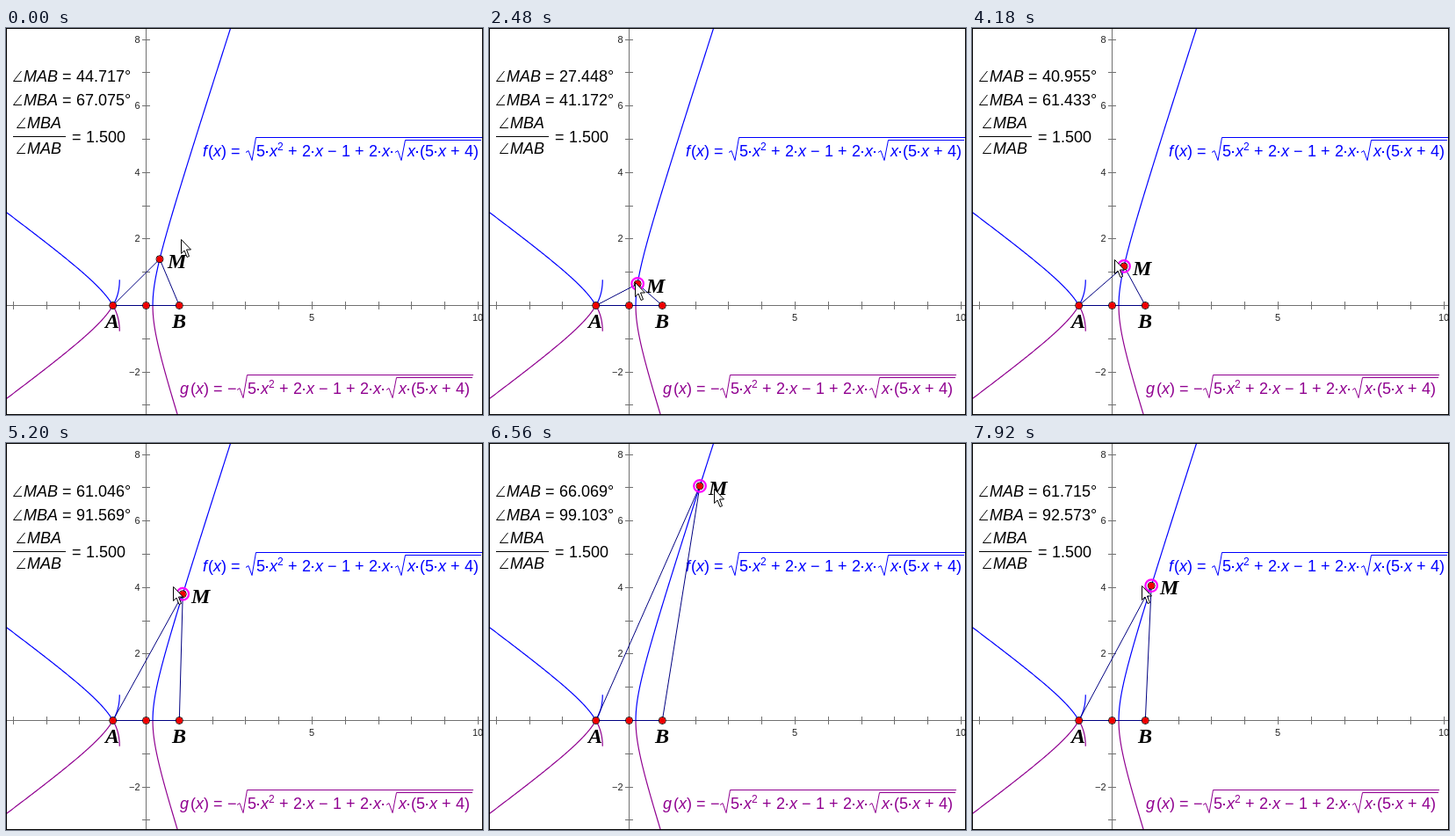
An HTML page with a canvas for the animation above (8000 ms loop, 543 px wide and 440 px high).

```html
<!DOCTYPE html>
<html>
<head>
<meta charset="utf-8">
<style>
html, body { margin: 0; width: 100%; height: 100%; overflow: hidden; background: #fff; }
canvas { display: block; }
</style>
</head>
<body>
<canvas id="stage" width="543" height="440"></canvas>
<script>
const ctx = document.getElementById('stage').getContext('2d');
const W = 543, H = 440, LOOP = 8000;
const OX = 159.5, OY = 315.5, UNIT = 37.8;
const STEP = 340, FIRST_STEP = 100, GRAB_STEP = 4;
const SANS = '"Liberation Sans", Arial, sans-serif';
const SERIF = '"Liberation Serif", "Times New Roman", serif';
const BLUE = '#0000ff', PURPLE = '#900090', NAVY = '#000080';
const EASE_UP = 0.6, EASE_DOWN = 1.7;

// The drag: step, angle MAB in degrees, easing power on the way there.
const ANGLE_KEYS = [
  { step: 0, at: [44.7168] },
  { step: GRAB_STEP, at: [44.7168] },
  { step: 8, at: [27.448] },
  { step: 10, at: [17] },
  { step: 11, at: [22] },
  { step: 12, at: [22] },
  { step: 13, at: [40.9552] },
  { step: 16, at: [61.046], power: EASE_UP },
  { step: 20, at: [66.0688], power: EASE_UP },
  { step: 21, at: [66.25] },
  { step: 24, at: [61.7152], power: EASE_DOWN }
];
const CURSOR_KEYS = [
  { step: 0, at: [199, 240] },
  { step: 1, at: [201, 239] },
  { step: 2, at: [182, 258] },
  { step: 3, at: [178, 262] },
  { step: GRAB_STEP, at: [178, 262] },
  { step: 8, at: [166, 289] },
  { step: 10, at: [165, 301] },
  { step: 11, at: [165, 288] },
  { step: 12, at: [165, 288] },
  { step: 13, at: [162, 263] },
  { step: 16, at: [190, 163] },
  { step: 20, at: [256, 52] },
  { step: 24, at: [193, 162] }
];

function valueAt(keys, step) {
  const i = keys.findIndex(key => key.step >= step);
  const to = keys[i], from = keys[Math.max(0, i - 1)];
  if (to.step === step) return to.at;
  const k = ((step - from.step) / (to.step - from.step)) ** (to.power || 1);
  return from.at.map((v, j) => v + (to.at[j] - v) * k);
}

const px = x => OX + x * UNIT;
const py = y => OY - y * UNIT;
const curve = x => Math.sqrt(Math.max(0,
  5 * x * x + 2 * x - 1 + 2 * x * Math.sqrt(Math.max(0, x * (5 * x + 4)))));

function path(points, color, width = 1) {
  ctx.beginPath();
  points.forEach(([x, y]) => ctx.lineTo(x, y));
  ctx.strokeStyle = color;
  ctx.lineWidth = width;
  ctx.stroke();
}

function text(s, x, y, font, color = '#000', align = 'left') {
  ctx.font = font;
  ctx.fillStyle = color;
  ctx.textAlign = align;
  ctx.fillText(s, x, y);
}

const upright = (s, x, y, color) => text(s, x, y, `18px ${SANS}`, color);
const italic = (s, x, y, color) => text(s, x, y, `italic 18px ${SANS}`, color);
const pointLabel = (s, x, y) => text(s, x, y, `italic bold 24px ${SERIF}`);

// Sets a formula on whole-pixel advances; ² becomes a small raised digit.
function formula(s, x, y, color) {
  const advance = { 'x': 9, '·': 5, ' ': 5, '(': 6, ')': 6, '+': 11, '−': 11, '²': 7 };
  for (const c of s) {
    if (c === '²') text('2', x, y - 7, `12px ${SANS}`, color);
    else if (c === '·') { ctx.fillStyle = color; ctx.fillRect(x + 1, y - 6, 2, 2); }
    else (c === 'x' ? italic : upright)(c, x, y, color);
    x += advance[c] || 10;
  }
}

function radical(x, top, bottom, end, color) {
  path([[x, bottom - 9], [x + 3, bottom - 11], [x + 7, bottom], [x + 11.5, top], [end, top]], color);
}

function rootExpression(x, y, color) {
  radical(x, y - 21.5, y + 4.5, x + 269, color);
  formula('5·x² + 2·x − 1 + 2·x·', x + 12, y, color);
  radical(x + 170, y - 18.5, y + 4.5, x + 268, color);
  formula('x·(5·x + 4)', x + 184, y, color);
}

function angleName(name, x, y) {
  path([[x + 9.5, y - 12], [x + 0.5, y - 0.5], [x + 10, y - 0.5]], '#000');
  italic(name, x + 12, y);
}

function circle(x, y, radius, color, width) {
  ctx.beginPath();
  ctx.arc(x, y, radius, 0, 2 * Math.PI);
  ctx.strokeStyle = color;
  ctx.lineWidth = width;
  ctx.stroke();
}

function dot(x, y) {
  circle(x, y, 4, '#000', 1);
  ctx.fillStyle = '#f00000';
  ctx.beginPath();
  ctx.arc(x, y, 3.5, 0, 2 * Math.PI);
  ctx.fill();
}

function drawAxes() {
  const gray = '#707070';
  path([[0, OY], [W, OY]], gray);
  path([[OX, 0], [OX, H]], gray);
  for (let i = -4; i <= 10; i++) {
    const x = Math.floor(px(i)) + 0.5;
    path([[x, OY - 4.5], [x, OY + 4.5]], gray);
    if (i > 0 && i % 5 === 0) text(i, x - 0.5, 332.5, `11px ${SANS}`, '#222', 'center');
  }
  for (let i = -3; i <= 8; i++) {
    const y = Math.floor(py(i)) + 0.5;
    path([[OX - 4.5, y], [OX + 4.5, y]], gray);
    if (i && i % 2 === 0) {
      text(String(i).replace('-', '−'), 152.5, y + 3.5, `11px ${SANS}`, '#222', 'right');
    }
  }
}

function drawCurves() {
  for (const [sign, color] of [[1, BLUE], [-1, PURPLE]]) {
    for (const [start, dir] of [[-0.8, -1], [0.2, 1]]) {
      const points = [];
      for (let u = 0; u <= 1.9; u += 0.01) {
        const x = start + dir * u * u;
        points.push([px(x), py(sign * curve(x))]);
      }
      path(points, color, 1.2);
    }
  }
}

function drawFormulas() {
  italic('f', 224, 146, BLUE);
  formula('(x)', 230, 146, BLUE);
  upright('=', 256, 146, BLUE);
  rootExpression(273, 146, BLUE);
  italic('g', 198, 416, PURPLE);
  formula('(x)', 210, 416, PURPLE);
  upright('=', 236, 416, PURPLE);
  upright('−', 252, 416, PURPLE);
  rootExpression(263, 416, PURPLE);
}

function drawMeasures(angle) {
  [['MAB', angle, 61], ['MBA', 1.5 * angle, 88]].forEach(([name, value, y]) => {
    angleName(name, 8, y);
    upright('=', 64, y);
    upright(value.toFixed(3) + '°', 80, y);
  });
  angleName('MBA', 12, 114);
  path([[8, 123.5], [68, 123.5]], '#000');
  angleName('MAB', 12, 143);
  upright('=', 75, 130);
  upright('1.500', 91, 130);
}

function drawCursor(x, y) {
  ctx.beginPath();
  [[0, 0], [0, 16], [3.5, 12.5], [6.5, 20], [9, 19], [6, 11.5], [11, 11.5]]
    .forEach(([dx, dy]) => ctx.lineTo(x + 0.5 + dx, y + 0.5 + dy));
  ctx.closePath();
  ctx.fillStyle = '#fff';
  ctx.fill();
  ctx.strokeStyle = '#000';
  ctx.lineWidth = 1;
  ctx.stroke();
}

function draw(time) {
  const step = Math.floor((time - FIRST_STEP) / STEP) + 1;
  const [angle] = valueAt(ANGLE_KEYS, step);
  const [cursorX, cursorY] = valueAt(CURSOR_KEYS, step).map(Math.round);
  // M sees A under the angle a and B under 1.5 a.
  const a = angle * Math.PI / 180;
  const x = Math.sin(a / 2) / Math.sin(2.5 * a);
  const mx = px(x), my = py(Math.tan(a) * (x + 1));

  ctx.fillStyle = '#fff';
  ctx.fillRect(0, 0, W, H);
  drawAxes();
  drawCurves();
  drawFormulas();
  drawMeasures(angle);

  path([[px(1), OY], [px(-1), OY], [mx, my], [px(1), OY]], NAVY);
  for (const i of [-1, 0, 1]) dot(px(i), OY);
  if (step >= GRAB_STEP) circle(mx, my, 6.8, '#ff00ff', 2.2);
  dot(mx, my);
  pointLabel('A', 113, 341);
  pointLabel('B', 189, 341);
  pointLabel('M', Math.floor(mx) + 10, Math.round(my) + 10);
  drawCursor(cursorX, cursorY);

  ctx.strokeStyle = '#000';
  ctx.lineWidth = 1;
  ctx.strokeRect(0.5, 0.5, W - 1, H - 1);
}

let origin = null;
function tick(now) {
  if (origin === null) origin = now;
  draw(Math.max(0, now - origin) % LOOP);
  requestAnimationFrame(tick);
}
draw(0);
requestAnimationFrame(tick);
</script>
</body>
</html>
```
